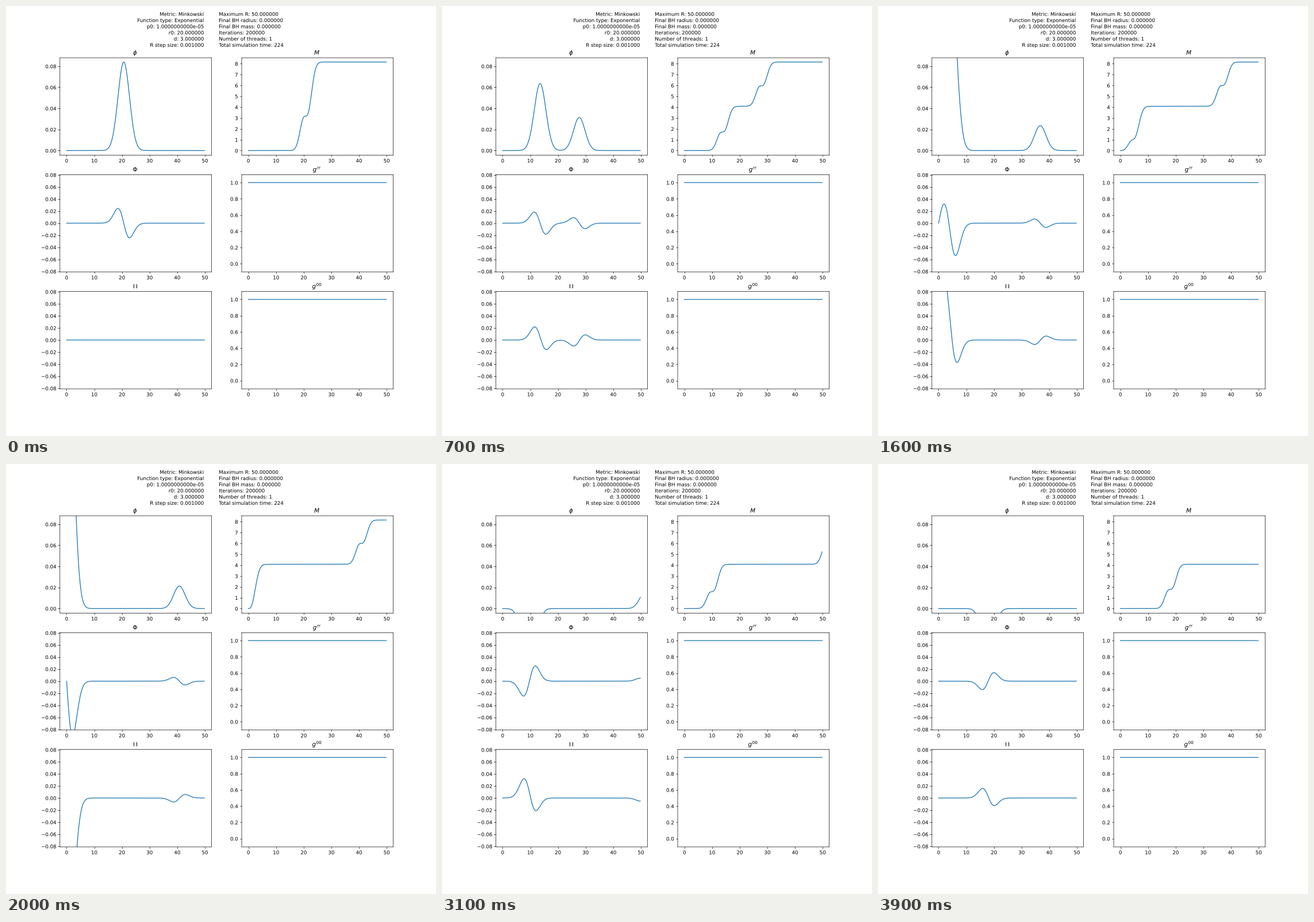
Animation, 748 px wide and 748 px high, one loop 4 s. Source, as a matplotlib script:

```python
import numpy as np
import matplotlib.pyplot as plt
from matplotlib import patheffects
from matplotlib.animation import FuncAnimation
from matplotlib.transforms import Affine2D

SIZE = 748
FRAMES = 40
P0, R0, D = 1e-5, 20.0, 3.0

# Unsnapped strokes and outline text keep sub-pixel positions.
plt.rcParams["font.family"] = "DejaVu Sans"
plt.rcParams["path.snap"] = False
plt.rcParams["path.effects"] = [patheffects.Normal()]

r = np.arange(0, 49.81, 0.05)
r[0] = 1e-3  # keeps the 1/r terms finite at the origin


def pulse(x):
    """Initial radial profile and its slope."""
    envelope = P0 * np.exp(-((x - R0) / D) ** 2)
    return envelope * x**3, envelope * (3 * x**2 - 2 * x**3 * (x - R0) / D**2)


def wave(x):
    """Odd extension of x * pulse(x), with its derivative."""
    a = np.abs(x)
    value, slope = pulse(a)
    return x * value, value + a * slope


def fields(t):
    """Spherical wave in flat space, starting at rest."""
    inward, d_inward = wave(r + t)
    outward, d_outward = wave(r - t)
    phi = (inward + outward) / (2 * r)
    dphi_dr = (d_inward + d_outward) / (2 * r) - phi / r
    dphi_dt = (d_inward - d_outward) / (2 * r)
    density = 2 * np.pi * r**2 * (dphi_dr**2 + dphi_dt**2)
    steps = (density[1:] + density[:-1]) / 2 * np.diff(r)
    mass = np.concatenate(([0], np.cumsum(steps)))
    return phi, mass, dphi_dr, dphi_dt


fig, axes = plt.subplots(3, 2, figsize=(12, 12), dpi=SIZE / 12)

left_info = [
    "Metric: Minkowski",
    "Function type: Exponential",
    "p0: 1.0000000000e-05",
    "r0: 20.000000",
    "d: 3.000000",
    "R step size: 0.001000",
]
right_info = [
    "Maximum R: 50.000000",
    "Final BH radius: 0.000000",
    "Final BH mass: 0.000000",
    "Iterations: 200000",
    "Number of threads: 1",
    "Total simulation time: 224",
]
for x, align, lines in ((0.46, "right", left_info), (0.495, "left", right_info)):
    for i, line in enumerate(lines):
        y = 1 - (17.2 + 10.75 * i) / SIZE
        fig.text(x, y, line, ha=align, va="baseline", fontsize=10)


def panel(ax, title, y, ylim=None):
    line, = ax.plot(r, y)
    ax.set_title(title)
    if ylim:
        ax.set_ylim(*ylim)
    return line


phi, mass, dphi_dr, dphi_dt = fields(0)
flat = np.ones_like(r)
slope_lim = (-0.0807, 0.0807)
metric_lim = (-0.1, 1.1)

moving = [
    panel(axes[0, 0], r"$\phi$", phi),
    panel(axes[0, 1], r"$M$", mass),
    panel(axes[1, 0], r"$\Phi$", dphi_dr, slope_lim),
    panel(axes[2, 0], r"$\Pi$", dphi_dt, slope_lim),
]
panel(axes[1, 1], r"$g^{rr}$", flat, metric_lim)
panel(axes[2, 1], r"$g^{00}$", flat, metric_lim)

nudge = Affine2D().translate(0.3, -0.3)
for ax in axes.flat:
    # Resolve the automatic limits from the starting state, then hold them.
    ax.set_xlim(ax.get_xlim())
    ax.set_ylim(ax.get_ylim())
    for spine in ax.spines.values():
        spine.set_transform(spine.get_spine_transform() + nudge)


def update(frame):
    for line, y in zip(moving, fields(float(frame))):
        line.set_ydata(y)
    return moving


anim = FuncAnimation(fig, update, frames=FRAMES, interval=100, repeat=True)
plt.show()
```
